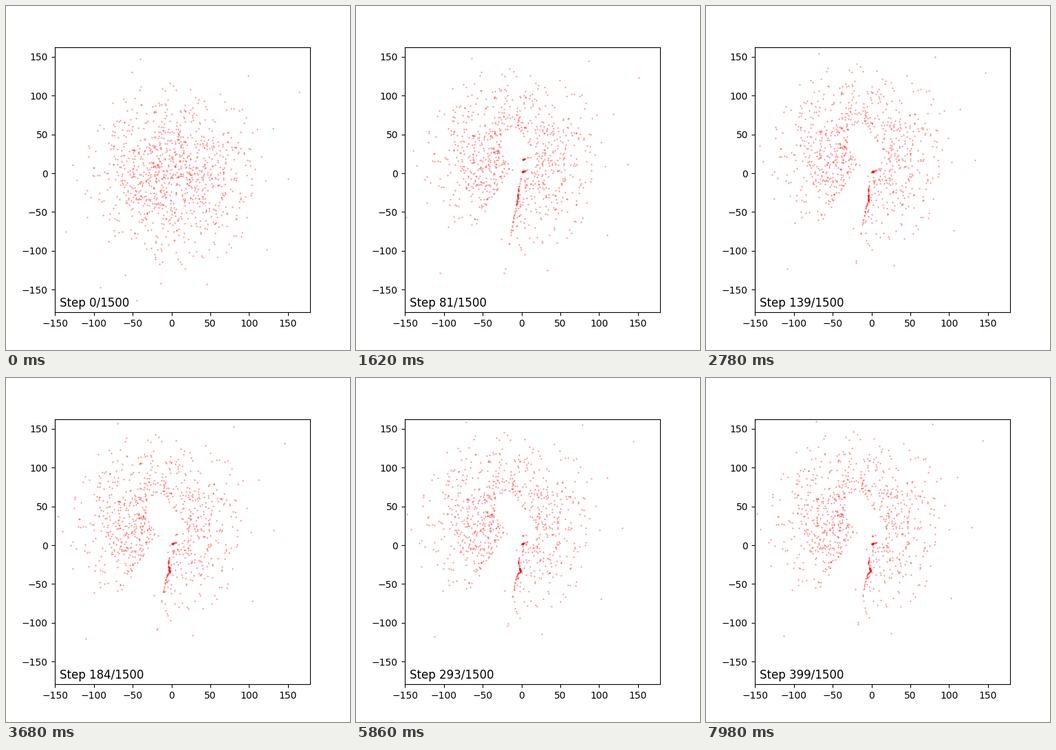
A matplotlib script for the animation above (8 s loop, 500 px wide and 500 px high).

```python
import numpy as np
import matplotlib.pyplot as plt
from matplotlib.animation import FuncAnimation

FRAMES, TOTAL, TAU = 400, 1500, 85
COUNT, SPREAD, CORE = 1000, 50, 125
DRIFT = np.array([-21.0, 30.0])

# the strays that set the reach of the cloud
STRAYS = [(-40, 147), (-51, 130), (99, 126), (164, 105), (131, 58),
          (-127, 11), (150, -7), (-136, -75), (123, -98), (46, -143),
          (-60, -131), (-14, -142), (-92, -147), (-45, -164)]


def start_points():
    rng = np.random.default_rng(4)
    cloud = rng.normal(0, SPREAD, (2 * COUNT, 2))
    cloud = cloud[np.hypot(*cloud.T) < CORE]
    return np.vstack([STRAYS, cloud[:COUNT - len(STRAYS)]])


def progress(step):
    return 1 - np.exp(-step / TAU)


def valley(y, s):
    bend = 7 * s ** 4 * np.exp(-((y + 38) / 10) ** 2)
    return -9 + 0.17 * (y + 50) + bend


def sink_top(s):
    if s < 0.68:
        return 2, 18
    return (1, 2) if s < 0.78 else (-1, 11)


def velocity(p, s):
    """Drift everywhere, a valley at lower left, two sinks in the middle."""
    x, y = p.T
    v = np.tile(DRIFT, (len(p), 1))

    gap = x - valley(y, s)
    near = (gap > 0) & (y < 0)
    v[near, 0] *= 1 - 0.6 * np.exp(-(gap[near] / 12) ** 2)

    wedge = (gap < 0) & (y < 1.9 * (x + 20) - 45)
    v[wedge, 0] = 14 + 200 * np.exp(-s / 0.12)
    v[wedge, 1] = 75 * (1 - 1.6 * np.exp(-((y[wedge] + 20) / 18) ** 2))

    sink = ((x - 2) / 16) ** 2 + ((y - 17) / 22) ** 2 < 1
    top = sink_top(s)
    tx = np.where(y > 9, top[0], 1)
    ty = np.where(y > 9, top[1], 2)
    v[sink, 0] = (10 * (tx - x))[sink]
    v[sink, 1] = (40 * (ty + 0.3 * (x - tx) - y))[sink]
    return v


def simulate(substeps=3):
    path = [start_points()]
    for k in range(FRAMES - 1):
        s = progress(k)
        ds = (progress(k + 1) - s) / substeps
        p = path[-1]
        for _ in range(substeps):
            p = p + velocity(p, s) * ds
        path.append(p)
    return path


path = simulate()

fig, ax = plt.subplots(figsize=(5, 5), dpi=100)
ax.set_aspect("equal")
ax.set_xlim(-150.55, 178.35)
ax.set_ylim(-179, 162.3)
ticks = range(-150, 151, 50)
ax.set_xticks(ticks)
ax.set_yticks(ticks)
dots = ax.plot([], [], ".", markersize=1, color="red", alpha=0.5)[0]
label = ax.text(0.02, 0.02, "", fontsize=12, transform=ax.transAxes)


def draw(k):
    dots.set_data(*path[k].T)
    label.set_text(f"Step {k}/{TOTAL}")
    return dots, label


anim = FuncAnimation(fig, draw, frames=FRAMES, interval=20, repeat=True,
                     repeat_delay=0)
plt.show()
```
